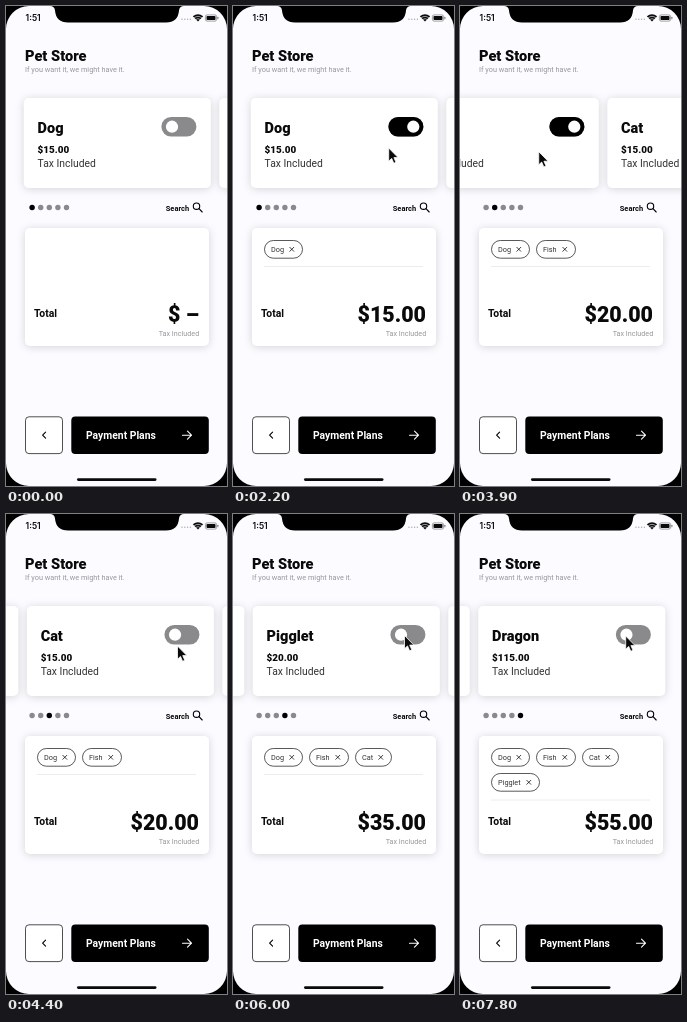
These frames come from a looping animation (221x480 px, 8000 ms). An HTML page:

```html
<!DOCTYPE html>
<html lang="en">
<head>
<meta charset="utf-8">
<title>Pet Store</title>
<style>
  html, body { margin: 0; width: 100%; height: 100%; overflow: hidden; background: #fcfbff; }
  svg { display: block; width: 221px; height: 480px; font-family: Roboto, sans-serif; fill: #0a0a0a; }
  .b { font-weight: 700; }
  .h { font-weight: 800; }
  .shadow { fill: #fff; filter: drop-shadow(0 1px 4px rgba(0, 0, 0, .16)); }
  .line { fill: none; stroke: #000; stroke-width: 1.1; stroke-linecap: round; stroke-linejoin: round; }
</style>
</head>
<body>
<svg viewBox="0 0 221 480">
  <rect width="221" height="480" fill="#fcfbff"/>
  <text class="h" x="19" y="55.2" font-size="14.6">Pet Store</text>
  <text x="19" y="66" font-size="7.3" fill="#98969b">If you want it, we might have it.</text>

  <g id="cards"></g>
  <g id="dots"></g>

  <text x="159.8" y="204.5" font-size="7.45" font-weight="600">Search</text>
  <g class="line"><circle cx="190.5" cy="200.2" r="3.2"/><path d="M193 202.7l3.2 3.3"/></g>

  <rect class="shadow" x="19" y="222" width="184" height="118" rx="5"/>
  <g id="cart"></g>
  <text class="b" x="28" y="311" font-size="10.4">Total</text>
  <text id="total" x="193" y="316" font-size="21.4" font-weight="900" text-anchor="end"></text>
  <text x="193.2" y="330" font-size="7.2" fill="#98969b" text-anchor="end">Tax Included</text>

  <rect x="19.5" y="410.8" width="37" height="36.8" rx="3.5" fill="#fff" stroke="#222" stroke-width=".8"/>
  <path class="line" d="M39.6 426.2l-3 3 3 3"/>
  <rect x="65.3" y="410.5" width="137.5" height="37.4" rx="4" fill="#000"/>
  <text x="80" y="433.2" font-size="10.35" font-weight="600" fill="#fff">Payment Plans</text>
  <path class="line" style="stroke:#fff" d="M176.5 429.2h9m-4-4l4 4l-4 4"/>
  <rect x="71" y="472.2" width="79.5" height="2.7" rx="1.35"/>

  <!-- phone frame, notch and status bar -->
  <path fill="#000" fill-rule="evenodd" d="M0 0H221V480H0ZM23 0A23 23 0 0 0 0 23V457A23 23 0 0 0 23 480H198A23 23 0 0 0 221 457V23A23 23 0 0 0 198 0Z"/>
  <path fill="#000" d="M44 0Q48.5 0 49 4.5Q50 16.5 62 16.5H160Q172 16.5 173 4.5Q173.5 0 178 0Z"/>
  <text x="19.6" y="15" font-size="8.5" font-weight="600" font-family="Inter, sans-serif">1:51</text>
  <path class="line" style="stroke:#aaa;stroke-width:1.4;stroke-dasharray:0 2.8" d="M176 13.3h9"/>
  <path d="M192 15.5L186.8 10.3Q192 6 197.2 10.3Z"/>
  <path fill="none" stroke="#fcfbff" stroke-width=".6" d="M188 12Q192 8.7 196 12M189.6 13.6Q192 11.6 194.4 13.6"/>
  <rect x="199.4" y="8.9" width="11.2" height="6.2" rx="1.7" fill="none" stroke="#777" stroke-width=".7"/>
  <rect x="200.5" y="10" width="9" height="4" rx=".8"/>
  <rect x="211.4" y="10.8" width="1" height="2.4" rx=".5" fill="#777"/>

  <path id="cursor" d="M0 0V13.2L3 10.4L5.1 15.3L7.3 14.3L5.2 9.6H9.4Z" stroke="#fff" stroke-width=".8" stroke-linejoin="round"/>
</svg>
<script>
const LOOP = 8000, STEP = 100, PITCH = 195.5, DRAG = 110, DRAG_MS = 250;
const GREY = '#8a898b';
const el = id => document.getElementById(id);
const clamp = v => Math.max(0, Math.min(1, v));
const ease = v => v * v * (3 - 2 * v);

// chip: [x, y, width] of the tag shown once the pet is added
const pets = [
  { name: 'Dog', price: 15, on: 1600, chip: [31, 234, 39] },
  { name: 'Fish', price: 5, on: 3400, chip: [76, 234, 40] },
  { name: 'Cat', price: 15, on: 4700, chip: [122, 234, 37] },
  { name: 'Pigglet', price: 20, on: 6300, chip: [31, 259, 49] },
  { name: 'Dragon', price: 115, on: Infinity }
];
const swipes = [2300, 3750, 5300, 6923];

// cursor tip: [time, x, y]
const path = [
  [500, 14, 151], [900, 168, 108], [1000, 168, 115], [1700, 168, 115],
  [2200, 155.7, 142], [2300, 150, 144], [2550, 40, 146], [3200, 175.5, 117],
  [3450, 175, 117], [3750, 150, 145], [4000, 40, 146], [4400, 171.5, 132],
  [4600, 174, 120], [4800, 174, 120], [5300, 140, 146], [5550, 30, 147],
  [6000, 171.5, 121.5], [6400, 171, 122], [6900, 106, 148], [7000, 71, 147.5],
  [7173, -3, 148], [7700, 166, 124], [7800, 165.7, 122]
];

// a finger drag, then a settling glide
function swiped(u) {
  if (u <= 0) return 0;
  if (u < DRAG_MS) return DRAG * u / DRAG_MS;
  return PITCH - (PITCH - DRAG) * Math.exp((DRAG_MS - u) / 120);
}

function card(pet, x, t) {
  const k = ease(clamp((t - pet.on + 50) / 200));
  return `<g transform="translate(${x} 92)">
    <rect class="shadow" width="187" height="90" rx="5"/>
    <text class="h" x="13.8" y="35" font-size="14.5">${pet.name}</text>
    <text class="h" x="13.8" y="55" font-size="9.9">$${pet.price}.00</text>
    <text x="13.8" y="69" font-size="10.35" fill="#333">Tax Included</text>
    <rect x="137.6" y="19" width="35" height="19.5" rx="9.75" fill="${GREY}"/>
    <rect x="137.6" y="19" width="35" height="19.5" rx="9.75" fill="#000" opacity="${k}"/>
    <circle cx="${148.2 + 14.3 * k}" cy="28.7" r="6.1" fill="#fff"/></g>`;
}

function chip({ name, on, chip: [x, y, w] }, t) {
  return `<g transform="translate(${x} ${y})" opacity="${clamp((t - on) / 200)}">
    <rect x=".5" y=".5" width="${w - 1}" height="17.7" rx="8.85" fill="#fff" stroke="#222" stroke-width=".75"/>
    <text x="7" y="12" font-size="7.3" fill="#333">${name}</text>
    <path class="line" style="stroke-width:.75" d="M${w - 13.2} 7.3l4 4m0 -4l-4 4"/></g>`;
}

function moveCursor(t) {
  const n = path.findIndex(p => p[0] > t);
  const b = path.at(n), a = n < 0 ? b : path[Math.max(0, n - 1)];
  const k = ease(clamp((t - a[0]) / (b[0] - a[0] || 1)));
  const [x, y] = [1, 2].map(i => a[i] + (b[i] - a[i]) * k);
  el('cursor').setAttribute('transform', `translate(${x} ${y})`);
  el('cursor').style.display = t < 500 ? 'none' : '';
}

function draw(t) {
  const scroll = swipes.reduce((sum, s) => sum + swiped(t - s), 0);
  const active = Math.round(scroll / PITCH);
  const added = pets.filter(p => t >= p.on + 100);
  const sum = added.reduce((s, p) => s + p.price, 0);

  el('cards').innerHTML = pets.map((p, i) => card(p, 17.8 + i * PITCH - scroll, t)).join('');
  el('dots').innerHTML = pets.map((p, i) =>
    `<circle cx="${26.1 + i * 8.6}" cy="201.5" r="2.7" fill="${i === active ? '#000' : GREY}"/>`).join('');
  const lineY = added.length > 3 ? 286 : 260.5;
  el('cart').innerHTML = added.map(p => chip(p, t)).join('') +
    (sum ? `<path d="M31 ${lineY}H190" stroke="#ececee"/>` : '');
  el('total').textContent = sum ? `$${sum}.00` : '$ –';
  moveCursor(t);
}

let last = -1;
const start = performance.now();
function frame() {
  const t = Math.floor((performance.now() - start) % LOOP / STEP) * STEP;
  if (t !== last) draw(last = t);
  requestAnimationFrame(frame);
}
frame();
</script>
</body>
</html>
```
